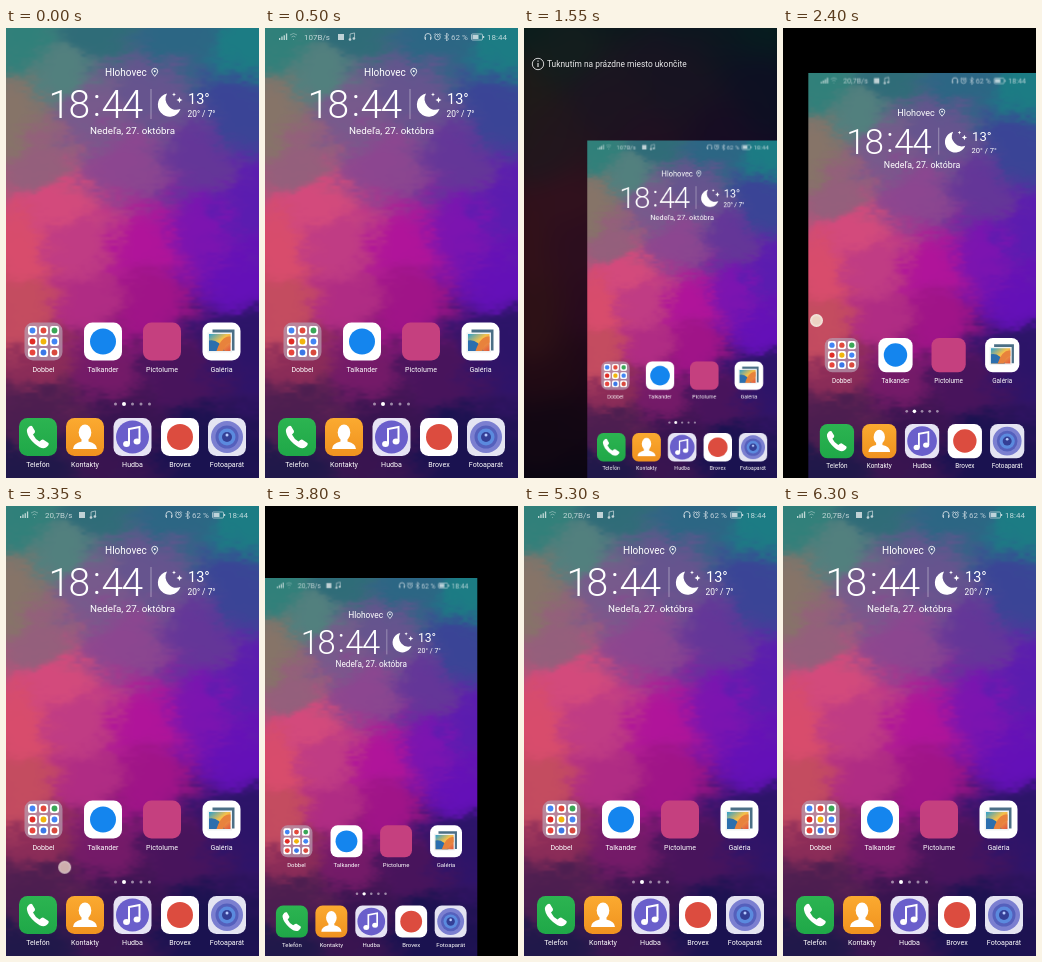
Recreate the animation shown at these times as an HTML page with a canvas. Size 253 px wide and 450 px high, loop 6.35 s.

```html
<!DOCTYPE html>
<html lang="sk">
<head>
<meta charset="utf-8">
<title>One-handed mode</title>
<style>
html, body { margin: 0; width: 100%; height: 100%; overflow: hidden; background: #000; }
#stage { position: relative; width: 253px; height: 450px; overflow: hidden; background: #000; }
#stage > *, #screen > * { position: absolute; left: 0; top: 0; width: 253px; height: 450px; }
svg { font-family: Roboto, "Noto Sans", sans-serif; fill: #fff; overflow: hidden; }
.mid { text-anchor: middle; }
.line { fill: none; stroke: #fff; }
.label { font-size: 7.1px; text-anchor: middle; }
.clock { font-size: 39px; font-weight: 300; letter-spacing: -1.6px; text-anchor: middle; }

#screen, #backdrop, #hint, #status, .speed, #stage > #touch { animation: 6350ms linear infinite; }
#screen { overflow: hidden; animation-name: shrink, side; animation-duration: 6350ms, 6350ms;
  animation-timing-function: linear, step-end; animation-iteration-count: infinite; }
#backdrop { filter: blur(9px) brightness(.23); transform: scale(1.12); }
#backdrop, #hint { animation-name: reveal; }
#status { animation-name: statusIn; }
.speed { animation-name: slow; animation-timing-function: step-end; }
.fast { animation-name: fast; }
#stage > #touch { left: -6.5px; top: -6.5px; width: 13px; height: 13px; border-radius: 50%;
  background: radial-gradient(circle, #ecd3c4 40%, #f4e8e0 70%, #e2d2ca);
  animation-name: swipe; }

@keyframes shrink {
  0%, 19.69% { transform: scale(1); animation-timing-function: ease-out; }
  24.41%, 36.38% { transform: scale(.75); }
  37.8% { transform: scale(.9); animation-timing-function: ease-out; }
  40.47%, 57.2% { transform: scale(1); animation-timing-function: ease-out; }
  62.99%, 75.75% { transform: scale(.75); }
  77.64% { transform: scale(.9); animation-timing-function: ease-out; }
  80.7%, 100% { transform: scale(1); }
}
@keyframes side {
  0% { transform-origin: 253px 450px; }
  45% { transform-origin: 0 450px; }
  90%, 100% { transform-origin: 253px 450px; }
}
@keyframes reveal {
  0%, 22% { opacity: 0; }
  24.41%, 36.3% { opacity: 1; }
  36.5%, 60% { opacity: 0; }
  62.99%, 75.7% { opacity: 1; }
  75.9%, 100% { opacity: 0; }
}
@keyframes statusIn {
  0%, .3% { opacity: 0; }
  2.36%, 100% { opacity: .7; }
}
@keyframes fast { 0% { opacity: 1; } 31.5%, 100% { opacity: 0; } }
@keyframes slow { 0% { opacity: 0; } 31.5%, 100% { opacity: 1; } }
@keyframes swipe {
  0%, 14.9% { opacity: 0; transform: translate(251px, 448px); }
  15% { opacity: .75; transform: translate(249px, 446px); }
  18.9% { opacity: .4; transform: translate(137px, 327px); }
  20.2% { opacity: 0; transform: translate(128px, 318px); }
  36% { opacity: 0; transform: translate(33px, 292px); }
  36.22%, 38.4% { opacity: 1; transform: translate(33px, 292px); }
  40.6% { opacity: 0; transform: translate(33px, 292px); }
  47.2% { opacity: 0; transform: translate(3px, 447px); }
  47.3% { opacity: .8; transform: translate(3px, 447px); }
  52.76% { opacity: .8; transform: translate(58px, 361px); }
  55.91% { opacity: .6; transform: translate(104px, 304px); }
  57% { opacity: 0; transform: translate(110px, 298px); }
  75.4% { opacity: 0; transform: translate(222px, 250px); }
  75.59%, 78% { opacity: 1; transform: translate(222px, 250px); }
  80.6%, 100% { opacity: 0; transform: translate(222px, 250px); }
}
</style>
</head>
<body>
<div id="stage">
  <canvas id="backdrop" width="253" height="450"></canvas>
  <svg id="hint" viewBox="0 0 253 450">
    <circle class="line" cx="14" cy="36" r="5.7" stroke-width=".8"/>
    <path class="line" d="M14 35v4M14 32.5v1.2"/>
    <text x="23" y="39.2" font-size="8.4" opacity=".9">Tuknutím na prázdne miesto ukončite</text>
  </svg>

  <div id="screen">
    <canvas id="wallpaper" width="253" height="450"></canvas>
    <svg viewBox="0 0 253 450">
      <defs>
        <rect id="tile" x="-19" y="-19" width="38" height="38" rx="8.5"/>
        <path id="note" d="M-2.6 3.4V-4L3.4-5.4V2" class="line"/>
        <linearGradient id="photo" x2="1" y2="1"><stop stop-color="#2a9fd0"/><stop offset=".45" stop-color="#f4c04a"/><stop offset="1" stop-color="#e0553c"/></linearGradient>
        <linearGradient id="call" x2="0" y2="1"><stop stop-color="#2cb451"/><stop offset="1" stop-color="#1fa848"/></linearGradient>
        <linearGradient id="people" x2="0" y2="1"><stop stop-color="#fbaa30"/><stop offset="1" stop-color="#f0921f"/></linearGradient>
      </defs>

      <g id="status" font-size="8">
        <path d="M14 12v-2h1.3v2zM16.3 12V8.6h1.3V12zM18.6 12V7.2h1.3V12zM20.9 12V5.5h1.3V12z"/>
        <path class="line" opacity=".5" d="M25 7q3.5-3 7 0M26.5 9q2-1.8 4 0M28.5 11v1"/>
        <text class="speed fast" x="39" y="12">107B/s</text>
        <text class="speed" x="39" y="12">20,7B/s</text>
        <rect x="73" y="6" width="6" height="6"/>
        <use href="#note" transform="translate(87 9) scale(.75)"/>
        <path d="M83.6 11.5a1.4 1.2 0 1 0 2.8 0a1.4 1.2 0 1 0-2.8 0M87.5 10.5a1.4 1.2 0 1 0 2.8 0a1.4 1.2 0 1 0-2.8 0"/>
        <path class="line" d="M160 11V8.5a3 3 0 0 1 6 0V11M160.4 9v3M165.6 9v3"/>
        <circle class="line" cx="172.5" cy="9" r="2.8" stroke-width=".9"/>
        <path class="line" stroke-width=".8" d="M172.5 7.2V9h1.4M169 6.8l1.6-1.6M176 6.8l-1.6-1.6M179.6 7l4 4-2 2V5l2 2-4 4"/>
        <text x="186" y="12">62 %</text>
        <rect class="line" x="206.5" y="6" width="11" height="6" rx="1" stroke-width=".8"/>
        <path d="M207.5 7h6v4h-6zM218 8h1.2v2H218z"/>
        <text x="222" y="12">18:44</text>
      </g>

      <text x="99" y="48" font-size="10">Hlohovec</text>
      <path class="line" stroke-width=".9" d="M148.7 48.3q-3-3.2-3-5a3 3 0 0 1 6 0q0 1.8-3 5z"/>
      <circle cx="148.7" cy="43.2" r="1"/>
      <text class="clock" x="62.5" y="90">18</text>
      <text class="clock" x="90" y="88">:</text>
      <text class="clock" x="115.5" y="90">44</text>
      <path class="line" opacity=".5" stroke-width=".8" d="M145 61v30"/>
      <path d="M161 65.5a11.7 11.7 0 1 0 13.5 15.500a11 11 0 0 1-13.5-15.5z"/>
      <path d="M168 64.5l.6 1.4 1.4.6-1.4.6-.6 1.4-.6-1.4-1.4-.6 1.4-.6zM173.5 69l.9 2.1 2.1.9-2.1.9-.9 2.1-.9-2.1-2.1-.9 2.1-.9z"/>
      <text x="182" y="76" font-size="14.500">13°</text>
      <text x="181.5" y="89" font-size="8.4">20° / 7°</text>
      <text class="mid" x="126.5" y="106" font-size="9.8">Nedeľa, 27. októbra</text>

      <g transform="translate(37.5 313.5)">
        <use href="#tile" fill="#b8a0b4" opacity=".7"/>
        <g id="folder"></g>
        <text class="label" y="30.5">Dobbel</text>
      </g>
      <g transform="translate(97 313.5)">
        <use href="#tile"/>
        <circle r="13" fill="#1485ee"/>
        <text class="label" y="30.5">Talkander</text>
      </g>
      <g transform="translate(156 313.5)">
        <use href="#tile" fill="#c5407f"/>
        <text class="label" y="30.5">Pictolume</text>
      </g>
      <g transform="translate(215.5 313.5)">
        <use href="#tile"/>
        <path d="M-9-12H13V9H-9z" fill="#4b6f86"/>
        <path d="M-14-9H10.500V11H-14z" fill="#eef2f3"/>
        <path d="M-12.5-7.500H9V9.500H-12.500z" fill="url(#photo)"/>
        <path d="M-12.500 9.500V-1Q-3-3 3 9.500z" fill="#2c6fae"/>
        <path d="M-5 9.500Q0-6 9-5V1Q3 2 2 9.500z" fill="#e8823c"/>
        <text class="label" y="30.5">Galéria</text>
      </g>

      <g opacity=".5">
        <circle cx="109.5" cy="376" r="1.5"/><circle cx="126.5" cy="376" r="1.5"/>
        <circle cx="135" cy="376" r="1.5"/><circle cx="143.5" cy="376" r="1.5"/>
      </g>
      <circle cx="118" cy="376" r="2"/>

      <g transform="translate(32 409)">
        <use href="#tile" fill="url(#call)"/>
        <path d="M-10.5-8.5q2-3.5 4.5-2.5l3 5q.5 1.5-2 3.5q2 4.5 6.5 7q2.5-2.5 4-1.8l5 3.3q1 2-2.5 4.5q-4 2.5-11-3.5t-8-12q-.5-2.5.5-3.5z"/>
        <text class="label" y="30">Telefón</text>
      </g>
      <g transform="translate(79 409)">
        <use href="#tile" fill="url(#people)"/>
        <ellipse cy="-4.5" rx="6.3" ry="8"/>
        <path d="M-12 12q0-5.5 8.5-7.5V0h7v4.5q8.5 2 8.5 7.5z"/>
        <text class="label" y="30">Kontakty</text>
      </g>
      <g transform="translate(126.5 409)">
        <use href="#tile" fill="#e6e4f4"/>
        <circle r="16.5" fill="#6a5fcb"/>
        <path class="line" stroke-width="2" d="M-3.5 7V-8L7-10V4.500"/>
        <ellipse cx="-6" cy="7" rx="3.400" ry="3"/><ellipse cx="4.500" cy="4.500" rx="3.400" ry="3"/>
        <text class="label" y="30">Hudba</text>
      </g>
      <g transform="translate(174 409)">
        <use href="#tile"/>
        <circle r="13" fill="#dc4c3f"/>
        <text class="label" y="30">Brovex</text>
      </g>
      <g transform="translate(221 409)">
        <use href="#tile" fill="#e4e4f2"/>
        <circle r="16" fill="#7b7fd0"/><circle r="11.5" fill="#5560bc"/>
        <circle r="8.500" fill="#5b8ade"/><circle r="5" fill="#343f96"/>
        <circle cy="-2" r="1.500" fill="#b8cbff"/>
        <text class="label" y="30">Fotoaparát</text>
      </g>
    </svg>
  </div>
  <div id="touch"></div>
</div>

<script>
const W = 253, H = 450;

// Paint spots: x, y, colour
const spots = [
  [10, 5, '30807a'], [95, 5, '2f6c78'], [175, 10, '2c6684'], [245, 15, '1c7c84'],
  [55, 50, '52807e'], [5, 90, '867468'], [85, 90, '775a8c'], [150, 65, '66548e'],
  [235, 80, '3a4496'], [30, 130, '945f7c'], [110, 130, '8c4690'], [190, 135, '643698'],
  [50, 172, 'd44a7c'], [15, 220, 'd84c6c'], [75, 215, 'c03c84'], [140, 215, 'b0149a'],
  [205, 200, '7c14b0'], [243, 180, '5a1cb0'], [235, 255, '6410b8'], [15, 280, 'c44c60'],
  [80, 275, 'b02c84'], [145, 280, 'a01488'], [30, 335, '8c2c58'], [100, 335, '741a68'],
  [230, 310, '2c1468'], [170, 345, '48145c'], [25, 385, '4c1e50'], [110, 395, '381450'],
  [25, 440, '20184a'], [200, 420, '1a1250']
].map(([x, y, hex]) => [x, y, ...hex.match(/../g).map(c => parseInt(c, 16))]);

const hash = (x, y) => {
  const v = Math.sin(x * 127.1 + y * 311.7) * 43758.5453;
  return v - Math.floor(v);
};
const mix = (a, b, t) => a + (b - a) * t;
const ease = t => t * t * (3 - 2 * t);

function noise(x, y) {
  const ix = Math.floor(x), iy = Math.floor(y), u = ease(x - ix), v = ease(y - iy);
  return mix(mix(hash(ix, iy), hash(ix + 1, iy), u),
             mix(hash(ix, iy + 1), hash(ix + 1, iy + 1), u), v) - .5;
}
const cloud = (x, y) => noise(x / 40, y / 30) + noise(x / 17, y / 11) * .6 + noise(x / 6, y / 3) * .35;

function paintWallpaper(ctx) {
  const image = ctx.createImageData(W, H);
  for (let y = 0, i = 0; y < H; y++) {
    for (let x = 0; x < W; x++, i += 4) {
      const px = x + cloud(x, y) * 24, py = y + cloud(x + 500, y + 90) * 24;
      let r = 0, g = 0, b = 0, sum = 0;
      for (const [sx, sy, sr, sg, sb] of spots) {
        const w = ((px - sx) ** 2 + (py - sy) ** 2 + 350) ** -2.6;
        r += sr * w; g += sg * w; b += sb * w; sum += w;
      }
      image.data.set([r / sum, g / sum, b / sum, 255], i);
    }
  }
  ctx.putImageData(image, 0, 0);
}

const wallpaper = document.getElementById('wallpaper');
paintWallpaper(wallpaper.getContext('2d'));
document.getElementById('backdrop').getContext('2d').drawImage(wallpaper, 0, 0);

const folderColors = ['#4285f4', '#e2493c', '#3aa757', '#e12d26', '#f2b50c', '#4285f4', '#e8453c', '#3b78e7', '#d84a3e'];
document.getElementById('folder').innerHTML = folderColors.map((color, i) => {
  const x = (i % 3 - 1) * 11, y = (Math.floor(i / 3) - 1) * 11;
  return `<rect x="${x - 4.5}" y="${y - 4.5}" width="9" height="9" rx="2.2"/>` +
    `<circle cx="${x}" cy="${y}" r="2.9" fill="${color}"/>`;
}).join('');
</script>
</body>
</html>
```
